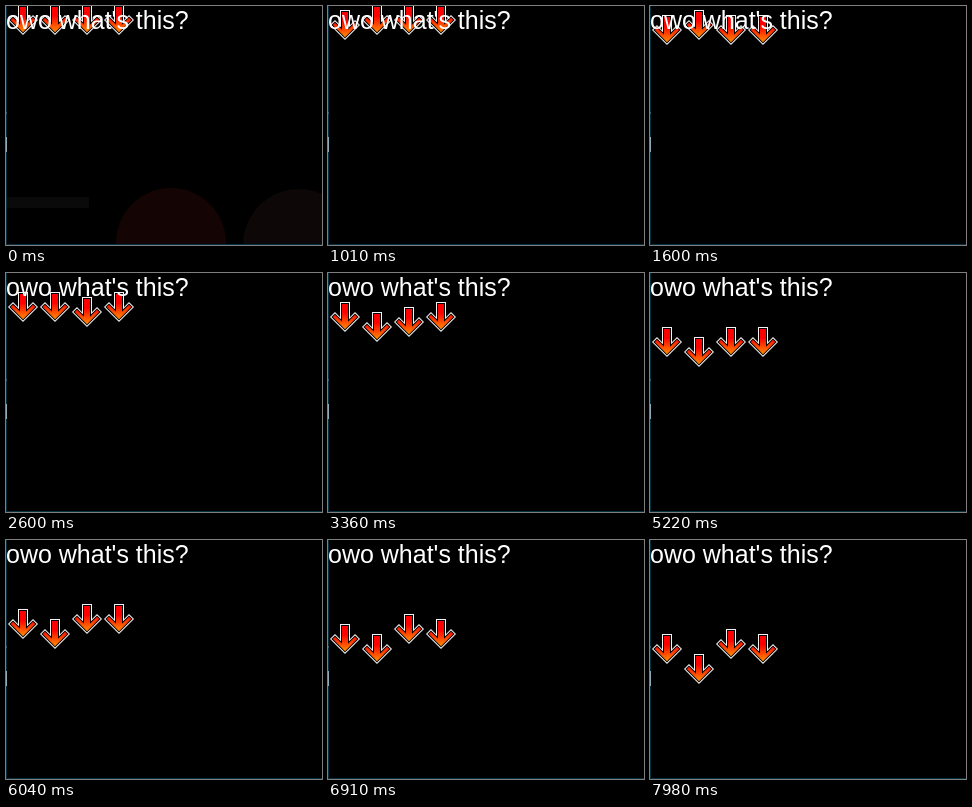
Write an HTML page that moves like this. It is 316 px wide and 239 px high and loops after 8 s.

```html
<!DOCTYPE html>
<html lang="en">
<head>
<meta charset="utf-8">
<title>Falling arrows</title>
<style>
  html, body { margin: 0; width: 100%; height: 100%; overflow: hidden; background: #000; }
  svg { display: block; width: 316px; height: 239px; }
  text { font: 25px "Liberation Sans", Arial, sans-serif; fill: #fff; }
</style>
</head>
<body>
<svg viewBox="0 0 316 239">
  <defs>
    <linearGradient id="heat" x1="0" y1="0" x2="0" y2="1">
      <stop offset=".35" stop-color="#fe0000"/>
      <stop offset="1" stop-color="#ff8a00"/>
    </linearGradient>
    <path id="shape" d="M12 2H18V19.8L25 12.8L27.2 15L15 27.2L2.8 15L5 12.8L12 19.8Z"/>
    <g id="arrow">
      <use href="#shape" stroke="#f2f2f2" stroke-width="4"/>
      <use href="#shape" stroke="#000" stroke-width="2"/>
      <use href="#shape" fill="url(#heat)"/>
    </g>
  </defs>
  <rect width="316" height="239"/>
  <g id="afterglow">
    <rect y="191" width="83" height="11" fill="#0a0a0a"/>
    <circle cx="165" cy="237" r="55" fill="#140504"/>
    <circle cx="293" cy="239" r="56" fill="#0d0707"/>
  </g>
  <path d="M.5 0V238.5H316" fill="none" stroke="#06303f"/>
  <path d="M.5 131V146" stroke="#8fa9b8"/>
  <path d="M.5 106V108" stroke="#2b5a70"/>
  <g id="arrows"></g>
  <text x="0" y="23">owo what's this?</text>
</svg>
<script>
  const LOOP = 8000, STEP = 5, TOP = -1, GLOW_END = 1010;

  // Runs of evenly spaced moves: first time, last time, columns that drop at each move.
  const runs = [
    [1010, 1600, "0 2 3 0 3 2 1"],
    [1720, 1770, "1 2"],
    [1890, 2660, "3 1 0 2 1 3 2 0 1"],
    [2710, 3360, "1 0 3 2 1 0 2 3 1"],
    [3480, 3600, "2 1"],
    [3700, 3890, "0 3 1"],
    [4070, 4410, "3 0 2 0 3"],
    [4530, 4870, "1 3 2 0 3"],
    [4990, 5510, "1 0 12 1 0 12 0"],
    [5680, 5860, "0 3 2"],
    [6040, 6160, "13 2"],
    [6240, 6740, "0 1 3 2 3 1 0 3"],
    [6860, 6910, "1 0"],
    [7030, 7030, "23"],
    [7270, 7510, "1 0 1 01"],
    [7690, 7800, "1 23"],
    [7980, 7980, "23"]
  ];

  const drops = [[], [], [], []];
  for (const [from, to, moves] of runs) {
    moves.split(" ").forEach((cols, i, all) => {
      const time = from + (to - from) * i / Math.max(1, all.length - 1);
      for (const col of cols) drops[col].push(time);
    });
  }

  const glow = document.getElementById("afterglow");
  const layer = document.getElementById("arrows");
  const arrows = drops.map(() => {
    const use = document.createElementNS("http://www.w3.org/2000/svg", "use");
    use.setAttribute("href", "#arrow");
    return layer.appendChild(use);
  });

  function draw(t) {
    glow.style.display = t < GLOW_END ? "" : "none";
    arrows.forEach((arrow, col) => {
      const count = drops[col].filter(time => time <= t).length;
      arrow.setAttribute("transform", `translate(${2 + 32 * col} ${TOP + STEP * count})`);
    });
  }

  const start = performance.now();
  function tick() {
    draw((performance.now() - start) % LOOP);
    requestAnimationFrame(tick);
  }
  tick();
</script>
</body>
</html>
```
